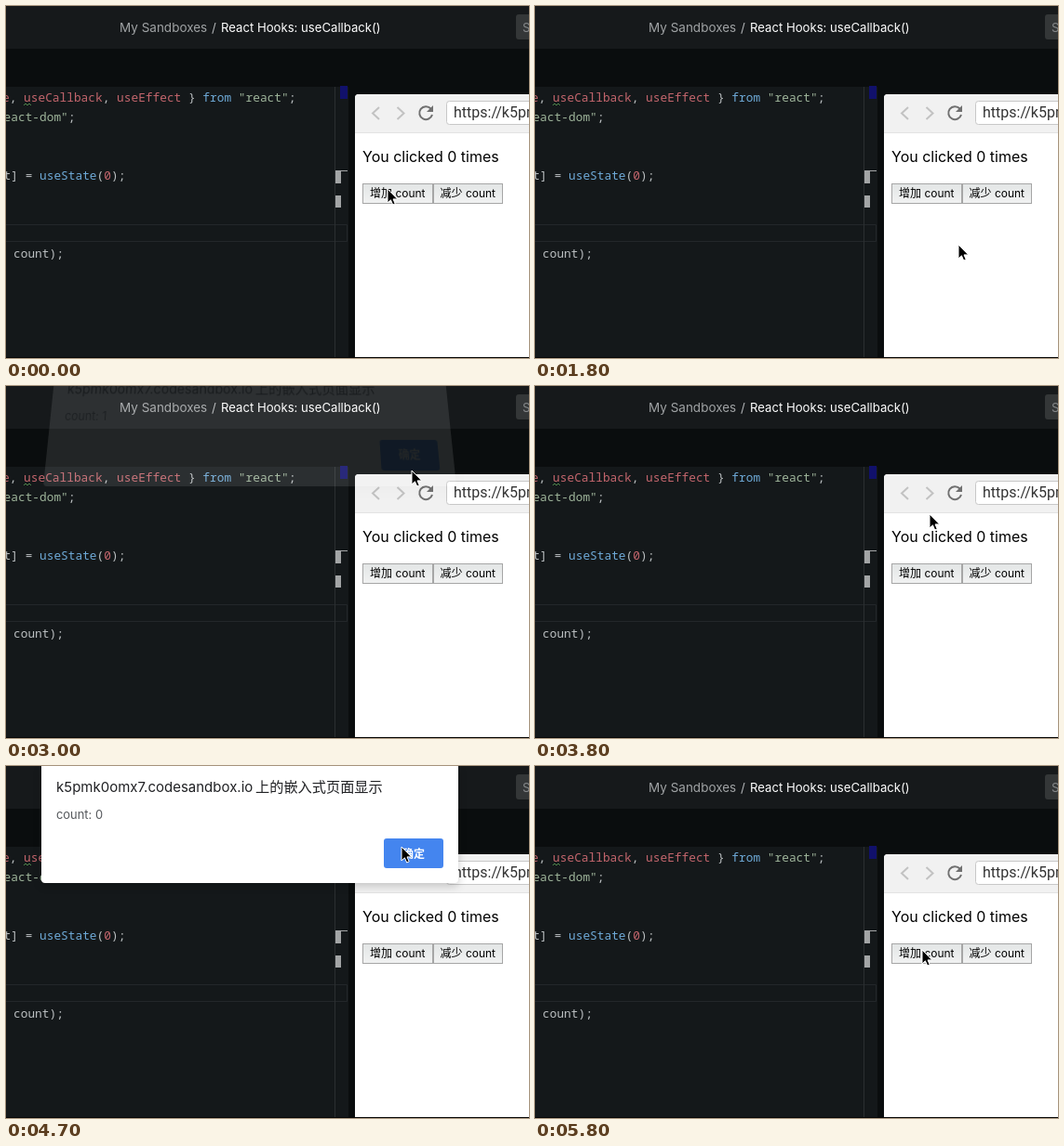
These frames come from a looping animation (562x379 px, 6000 ms). An HTML page:

```html
<!DOCTYPE html>
<html lang="zh-CN">
<head>
<meta charset="utf-8">
<title>useCallback demo</title>
<style>
html, body { margin: 0; width: 100%; height: 100%; overflow: hidden; background: #14181a; }
svg { position: absolute; left: 0; top: 0; display: block; }
text { font-family: Inter, "Noto Sans CJK SC", "Noto Sans CJK", sans-serif; white-space: pre; }
.code text { font: 12.82px "Noto Sans Mono", "DejaVu Sans Mono", monospace; fill: #bcc0c2; }
.code .id { fill: #c4666d; }
.code .fn { fill: #6fabd9; }
.code .str { fill: #9fb59b; }
#dialog { left: 38px; background: #fff; border-radius: 0 0 4px 4px; overflow: hidden;
  box-shadow: 0 3px 10px rgba(0,0,0,.2); transform-origin: 50% 100%; }
</style>
</head>
<body>
<svg width="562" height="379">
  <defs>
    <linearGradient id="face" x2="0" y2="1">
      <stop stop-color="#e3e6e6"/><stop offset="1" stop-color="#f1f2f2"/>
    </linearGradient>
  </defs>
  <rect width="562" height="379" fill="#14181a"/>
  <rect width="562" height="46" fill="#16191b"/>
  <rect y="46" width="562" height="41" fill="#0a0d0e"/>
  <text x="122" y="28" font-size="13.5" fill="#a0a3a5">My Sandboxes</text>
  <text x="221" y="28" font-size="13.5" fill="#b4b7b9">/</text>
  <text x="231" y="28" font-size="13.15" fill="#fff">React Hooks: useCallback()</text>
  <rect x="548" y="9" width="30" height="27" rx="3" fill="#343738"/>
  <text x="555" y="28" font-size="13" fill="#85888a">S</text>

  <!-- editor -->
  <path d="M0 235.5H366.5V253.5H0" fill="none" stroke="#23272a"/>
  <path d="M353.5 87V379" stroke="#2b2f31"/>
  <rect x="368" y="87" width="194" height="292" fill="#0a0d0e"/>
  <rect x="359" y="86" width="8" height="14" fill="#11116b"/>
  <path d="M354 177h13v1h-7v13h-6zM354 204h6v13h-6z" fill="#a3a5a6"/>
  <g class="code">
    <text x="-4" y="103"><tspan class="id">e</tspan>, <tspan class="id">useCallback</tspan>, <tspan class="id">useEffect</tspan> } <tspan class="fn">from</tspan> <tspan class="str">"react"</tspan>;</text>
    <path d="M19 107l2-2 2 2 2-2 2 2" fill="none" stroke="#4f8a4c"/>
    <text x="-2.4" y="124"><tspan class="str">eact-dom"</tspan>;</text>
    <text x="-2.4" y="187">t] = <tspan class="fn">useState</tspan>(<tspan class="id">0</tspan>);</text>
    <text x="8" y="271">count);</text>
  </g>

  <!-- preview -->
  <path d="M375 379V99q0-4 4-4H562V379z" fill="#fff"/>
  <path d="M375 136V99q0-4 4-4H562V136z" fill="#f1f1f1"/>
  <path d="M375 136.5H562" stroke="#e2e2e2"/>
  <g fill="none" stroke-width="2">
    <path d="M401 109l-7 6.5 7 6.5M420.5 109l7 6.5-7 6.5" stroke="#c2c2c2"/>
    <path d="M456.5 110.5A7 7 0 1 0 458 117" stroke="#707070"/>
  </g>
  <path d="M459 107v7h-7z" fill="#707070"/>
  <rect x="473.5" y="102.5" width="100" height="25" rx="3" fill="#fff" stroke="#c8c8c8"/>
  <text x="481" y="120" font-size="16" fill="#333" style="font-family:Roboto,sans-serif">https://k5pmk0omx7</text>
  <text id="clicked" x="383" y="168" font-size="16"></text>
  <g fill="url(#face)" stroke="#a6a6a6">
    <rect x="383.5" y="191.5" width="75" height="21"/>
    <rect x="459.5" y="191.5" width="74" height="21"/>
  </g>
  <g font-size="12">
    <text x="391" y="206">增加 count</text>
    <text x="466.5" y="206">减少 count</text>
  </g>
  <path d="M0 378.5H562" stroke="#050606"/>
</svg>

<svg id="dialog" width="448" height="126">
  <text x="16" y="28" font-size="15" fill="#202124">k5pmk0omx7.codesandbox.io</text>
  <text x="230" y="28" font-size="15.2" fill="#202124">上的嵌入式页面显示</text>
  <text id="message" x="16" y="57" font-size="12.9" fill="#55585c"></text>
  <rect x="368" y="78" width="64" height="32" rx="3" fill="#4485ef"/>
  <text x="400" y="98.5" font-size="12" font-weight="700" fill="#fff" text-anchor="middle">确定</text>
</svg>

<svg width="562" height="379">
  <path id="cursor" d="M0 0V15l3.4-3.2 2.3 5.2 2.5-1.1-2.2-5H10.7z" fill="#000" stroke="#fff"/>
</svg>

<script>
const el = id => document.getElementById(id);
const LOOP = 6000, STEP = 100;

// time, x, y of the pointer tip
const path = [
  [0, 410, 197], [200, 410, 197], [400, 395, 228], [500, 405, 240], [800, 506, 194],
  [1300, 506, 194], [1800, 455, 257], [2300, 455, 257], [2700, 436, 91],
  [3000, 436, 91], [3200, 428, 188], [3400, 424, 138], [4200, 424, 138],
  [4700, 425, 87], [5200, 425, 87], [5500, 408, 150], [5700, 407, 196], [5800, 416, 198]
];

const alerts = [
  { open: 2100, leave: 3000, end: 3100, count: 1 },
  { open: 4200, leave: 4900, end: 5100, count: 0 }
];

function pointer(t) {
  const i = path.findIndex(p => p[0] > t);
  if (i < 0) return path[path.length - 1].slice(1);
  const [t0, x0, y0] = path[i - 1], [t1, x1, y1] = path[i];
  const u = (t - t0) / (t1 - t0), k = u * u * (3 - 2 * u);
  return [x0 + (x1 - x0) * k, y0 + (y1 - y0) * k];
}

function drawDialog(t) {
  const a = alerts.find(a => t >= a.open && t < a.end);
  const dialog = el("dialog");
  dialog.style.visibility = a ? "visible" : "hidden";
  if (!a) return;
  el("message").textContent = "count: " + a.count;
  // tilts back while fading out
  const k = t < a.leave ? 0 : t < a.end - STEP ? 0.3 : 1;
  dialog.style.opacity = 1 - 0.9 * k;
  dialog.style.transform = k ? `translateY(${-18 * k}px) scale(${1 - 0.009 * k}) ` +
    `perspective(188px) rotateX(${5 * k}deg) scaleY(${1 + 0.08 * k})` : "none";
}

function draw(now) {
  const t = Math.floor(now % LOOP / STEP) * STEP;
  el("clicked").textContent = `You clicked ${t >= 100 && t < 1100 ? 1 : 0} times`;
  drawDialog(t);
  el("cursor").setAttribute("transform", `translate(${pointer(t)})`);
}

const start = performance.now();
function tick() {
  draw(performance.now() - start);
  requestAnimationFrame(tick);
}
tick();
</script>
</body>
</html>
```
